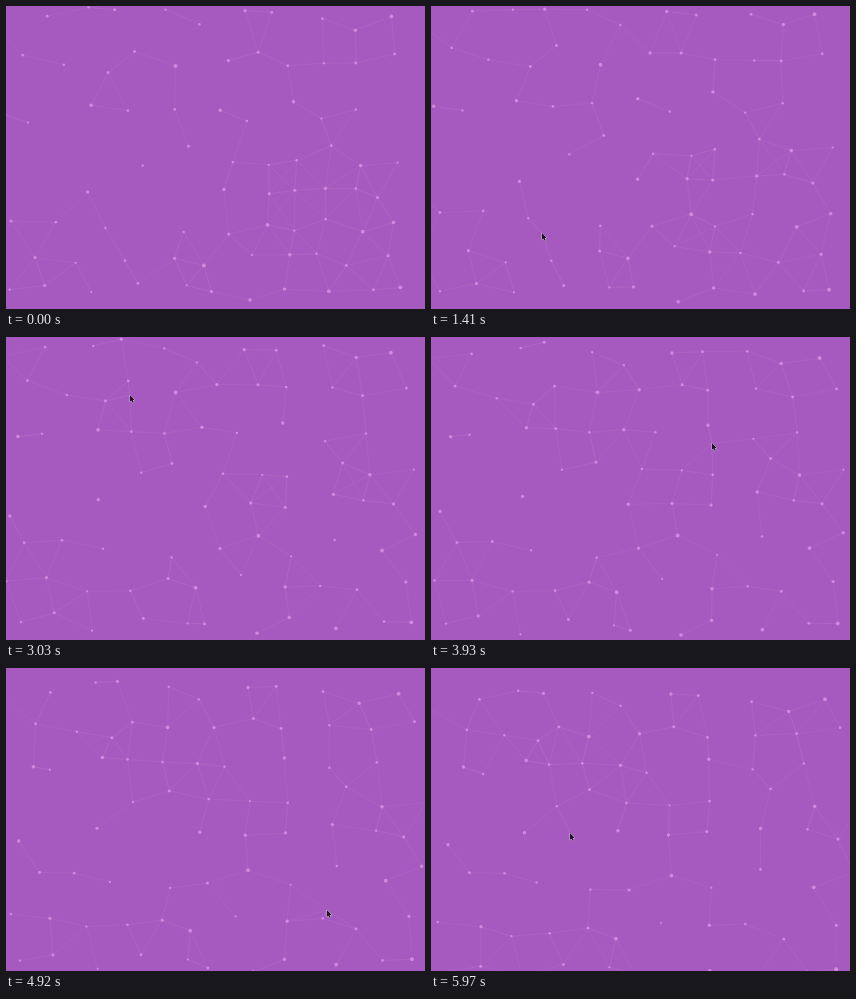
Write an HTML page with a canvas that moves like this. It is 419x303 px and loops after 6000 ms.

```html
<!DOCTYPE html>
<html lang="en">
<head>
<meta charset="utf-8">
<title>Drifting network</title>
<style>
  html, body { margin: 0; width: 100%; height: 100%; overflow: hidden; background: #a65abf; }
  canvas { display: block; }
</style>
</head>
<body>
<canvas id="stage" width="419" height="303"></canvas>
<script>
const W = 419, H = 303, LOOP = 6000, STEP = 30;
const PITCH = 39, JITTER = 20, REACH = 45;
const ctx = document.getElementById('stage').getContext('2d');
const { sin, cos, PI, hypot, floor, min, max } = Math;

let seed = 29;
function random() {
  seed = (seed * 16807) % 2147483647;
  return seed / 2147483647;
}

// A loose grid with a few clearings.
const clearings = [
  { x: 48, y: 145, r: 42 },
  { x: 142, y: 182, r: 30 },
  { x: 385, y: 110, r: 28 }
];
const inClearing = (x, y) => clearings.some(c => hypot(x - c.x, y - c.y) < c.r);

const dots = [];
for (let row = 0; row < 8; row++) {
  for (let col = 0; col < 11; col++) {
    const x = 10 + col * PITCH + (row % 2 ? 6 : -6) + (random() - 0.5) * JITTER;
    const y = 14 + row * PITCH + (random() - 0.5) * JITTER;
    const dot = { x, y, r: 1.1 + 0.85 * random(), phase: random() * 2 * PI };
    if (!inClearing(x, y)) dots.push(dot);
  }
}

// The middle drifts left while both sides drift right; the rows sag and part.
function place({ x, y, phase }, t) {
  const u = t / LOOP - 0.5;
  const turn = 2 * PI * u + phase;
  return [
    x + 36 * u * cos(2 * PI * x / W) * sin(PI * y / H) + 4 * u + 3 * sin(turn),
    y + 22 * u * cos(2 * PI * y / H) + 35 * u * u + 3 * cos(turn)
  ];
}

const mousePath = [
  [800, 130, 310], [1410, 111, 227], [2400, 25, 176], [3030, 124, 58],
  [3930, 281, 106], [4920, 321, 242], [5970, 139, 165]
];

// Smooth curve through [time, x, y] points.
function along(path, t) {
  const last = path.length - 1;
  let k = 0;
  while (k < last - 1 && t >= path[k + 1][0]) k++;
  const span = path[k + 1][0] - path[k][0];
  const u = (t - path[k][0]) / span;
  const slope = (i, axis) => {
    const a = path[max(0, i - 1)], b = path[min(last, i + 1)];
    return (b[axis] - a[axis]) / (b[0] - a[0]) * span;
  };
  return [1, 2].map(axis => {
    const p = path[k][axis], q = path[k + 1][axis];
    return p + (q - p) * u * u * (3 - 2 * u)
      + slope(k, axis) * u * (1 - u) ** 2
      - slope(k + 1, axis) * u * u * (1 - u);
  });
}

function link([ax, ay], [bx, by]) {
  const d = hypot(ax - bx, ay - by);
  if (d > REACH) return;
  ctx.globalAlpha = 0.17 * (1 - d / 68);
  ctx.beginPath();
  ctx.moveTo(ax, ay);
  ctx.lineTo(bx, by);
  ctx.stroke();
}

const arrow = new Path2D('M0 0V8L2 6.4L3.3 9.2L4.8 8.5L3.5 5.9H6Z');

function drawMouse([x, y]) {
  ctx.globalAlpha = 1;
  ctx.save();
  ctx.translate(x, y);
  ctx.scale(0.75, 0.85);
  ctx.strokeStyle = '#dcc8e2';
  ctx.lineWidth = 1.1;
  ctx.stroke(arrow);
  ctx.fillStyle = '#1c1220';
  ctx.fill(arrow);
  ctx.restore();
}

function draw(t) {
  ctx.globalAlpha = 1;
  ctx.fillStyle = '#a65abf';
  ctx.fillRect(0, 0, W, H);

  const spots = dots.map(dot => place(dot, t));
  const mouse = t >= mousePath[0][0] && along(mousePath, t);
  const nodes = mouse ? [...spots, mouse] : spots;

  ctx.strokeStyle = '#f6d4ff';
  ctx.lineWidth = 0.8;
  nodes.forEach((a, i) => nodes.slice(i + 1).forEach(b => link(a, b)));

  ctx.globalAlpha = 0.85;
  ctx.fillStyle = '#d592e4';
  spots.forEach(([x, y], i) => {
    ctx.beginPath();
    ctx.arc(x, y, dots[i].r, 0, 2 * PI);
    ctx.fill();
  });

  if (mouse) drawMouse(mouse);
}

const start = performance.now();
function tick() {
  const t = (performance.now() - start) % LOOP;
  draw(floor(t / STEP) * STEP);
  requestAnimationFrame(tick);
}
tick();
</script>
</body>
</html>
```
